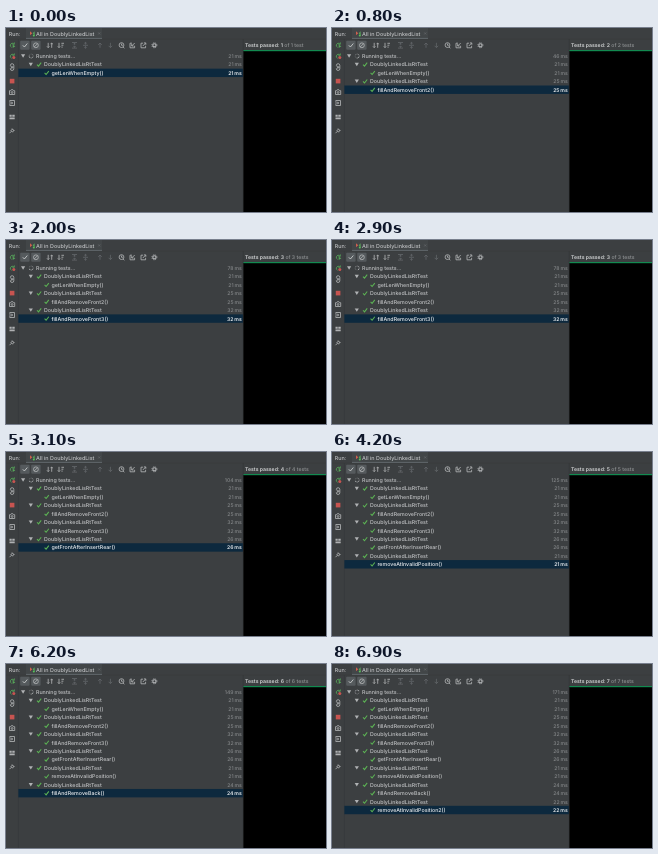
These frames come from a looping animation (320x184 px, 7000 ms). An HTML page:

```html
<!DOCTYPE html>
<html lang="en">
<head>
<meta charset="utf-8">
<title>Test runner</title>
<style>
  html, body { margin: 0; width: 100%; height: 100%; overflow: hidden; background: #3c3f41; }
  svg { display: block; width: 320px; height: 184px; }
  text { font: 500 5.3px Inter, "Open Sans", sans-serif; fill: #c0c2c4; text-rendering: geometricPrecision; white-space: pre; }
  .title { font-size: 5.4px; }
  .time { text-anchor: end; fill: #85888a; font-size: 5.1px; }
  .status { font-size: 5.15px; fill: #8f9294; }
  .strong { font-weight: 600; fill: #d2d4d5; }
  .selected text { fill: #eceef0; }
  .selected .time { font-weight: 600; }
  .icon { fill: none; stroke: #afb1b3; stroke-width: .85; }
  .dim { stroke: #616568; }
  .solid { fill: #afb1b3; }
  .green { stroke: #57a65a; }
  .tick { fill: none; stroke: #5cb354; stroke-width: 1.05; }
  .fold { fill: #b0b2b4; }
</style>
</head>
<body>
<svg id="stage" viewBox="0 0 320 184">
  <rect width="320" height="184" fill="#3c3f41"/>

  <!-- tab bar -->
  <rect x="20" width="76" height="10" fill="#424648"/>
  <path d="M0 11.2H320" stroke="#353839" stroke-width=".4"/>
  <rect x="20" y="9.9" width="76" height="1.1" fill="#5c6266"/>
  <text class="title" x="2.8" y="7.5">Run:</text>
  <path d="M24 3.2l2.2 2-2.2 2z" fill="#d0604f"/>
  <path d="M28.6 3.2l-2 2 2 2z" fill="#57a65a"/>
  <circle cx="27.8" cy="7.4" r="1" fill="#57c45a"/>
  <text class="title" x="30" y="7.5">All in DoublyLinkedList</text>
  <path class="icon dim" d="M92.3 4.5l1.9 1.9m0-1.9l-1.9 1.9"/>

  <!-- side strip -->
  <path d="M12.4 11V184" stroke="#343739" stroke-width=".4"/>
  <g class="icon">
    <path class="green" d="M7.7 15.7A2.1 2.1 0 1 0 5.6 19.3M8.3 14.4v1.9H6.4"/>
    <path d="M6.7 16.7l2.6 1.6-2.6 1.6z" fill="#57a65a" stroke="none"/>
    <path class="green" d="M7.7 26.7A2.1 2.1 0 1 0 5.6 30.3M8.3 25.4v1.9H6.4"/>
    <circle cx="7.8" cy="29.4" r="1.5" fill="#c75450" stroke="none"/>
    <path d="M4.4 38.4v-1a1.7 1.7 0 0 1 3.4 0v3.4a1.7 1.7 0 0 1-3.4 0v-.6M5.6 38.3l1.6 1-1.6 1z"/>
    <rect x="3.8" y="50.8" width="4.6" height="4.6" fill="#c75450" stroke="none"/>
    <path d="M3.5 62.7h1.2l.6-1h1.6l.6 1h1.2v3.8H3.5z"/>
    <circle cx="6.1" cy="64.5" r=".9"/>
    <path d="M3.8 73.8v-1.3h4.7v5H3.8v-1.3M3.2 75h3.4M5.3 73.7L6.6 75l-1.3 1.3"/>
    <path class="solid" stroke="none" d="M3.5 86.7h2.2v2H3.5zM6.3 86.7h2.4v2H6.3zM3.5 89.4h5.2v1.9H3.5z"/>
    <path d="M6 100.5l2.5 2.5M6.8 101.2l-2 1.2 1.8 1.8 1.2-2M5.5 103.2l-2 2"/>
  </g>

  <!-- toolbar -->
  <g fill="#555a5d">
    <rect x="14.2" y="12.8" width="9.4" height="9" rx="1"/>
    <rect x="25.2" y="12.8" width="9.4" height="9" rx="1"/>
  </g>
  <g class="icon">
    <path d="M16.8 17.3l1.6 1.7 2.9-3.5" stroke="#d0d2d3"/>
    <circle cx="29.9" cy="17.3" r="2.4"/>
    <path d="M28.2 19l3.4-3.4"/>
    <path d="M42.2 14.8v4.8M41 18.4l1.2 1.2 1.2-1.2M45.7 19.8V15M44.5 16.2l1.2-1.2 1.2 1.2"/>
    <path d="M53 14.8v4.8M51.8 18.4l1.2 1.2 1.2-1.2M55.4 15.3h2.6M55.4 17.2h2M55.4 19.1h1.3"/>
    <g class="dim">
      <path d="M66 14.5h5M66 20.1h5M68.5 16.8v-1.6M67.4 16.3l1.1-1.1 1.1 1.1M68.5 17.8v1.6M67.4 18.3l1.1 1.1 1.1-1.1"/>
      <path d="M77 17.3h5M79.5 13.9v2.2M78.3 15l1.2 1.1 1.2-1.1M79.5 20.7v-2.2M78.3 19.6l1.2-1.1 1.2 1.1"/>
      <path d="M94 19.8v-4.8M92.2 16.8l1.8-1.8 1.8 1.8"/>
      <path d="M104.4 14.8v4.8M102.6 17.8l1.8 1.8 1.8-1.8"/>
    </g>
    <circle cx="115.5" cy="17.1" r="2.4"/>
    <path d="M115.5 15.6v1.7h1.3M117 19l1.4 1.2"/>
    <path d="M126 15.2h-2v4.6h4.6v-2M128.7 15l-2.8 2.9M127.6 18h-1.9v-1.9"/>
    <path d="M137 15.2h-2v4.6h4.6v-2M136.8 18l2.8-2.9M137.9 14.9h1.9v1.9"/>
    <circle cx="148.4" cy="17.3" r="1.6" stroke-width="1.1"/>
    <circle cx="148.4" cy="17.3" r="2.5" stroke-dasharray="1 .963" stroke-width="1"/>
  </g>

  <g id="tree"></g>

  <!-- output pane -->
  <rect x="237.2" y="23" width="82.8" height="161" fill="#000"/>
  <path d="M237.2 11V184" stroke="#303335" stroke-width=".5"/>
  <rect x="237.5" y="22" width="82.5" height="1.2" fill="#128a50"/>
  <text id="status" class="status" x="239" y="18.8"><tspan class="strong"></tspan><tspan></tspan></text>
</svg>

<script>
const LOOP = 7000, ROW = 8.43, TOP = 28;
const SPIN_STEP = 135.5, SPIN_START = 2406;

// finish time, method, duration in ms
const tests = [
  [0, 'getLenWhenEmpty()', 21],
  [800, 'fillAndRemoveFront2()', 25],
  [1900, 'fillAndRemoveFront3()', 32],
  [3000, 'getFrontAfterInsertRear()', 26],
  [4100, 'removeAtInvalidPosition()', 21],
  [5200, 'fillAndRemoveBack()', 24],
  [6300, 'removeAtInvalidPosition2()', 22]
];

const tree = document.getElementById('tree');
const [passed, total] = document.getElementById('status').children;

function add(parent, tag, attrs, content) {
  const node = document.createElementNS('http://www.w3.org/2000/svg', tag);
  for (const name in attrs) node.setAttribute(name, attrs[name]);
  if (content) node.textContent = content;
  return parent.appendChild(node);
}

const duration = ms => ms + '\u2009ms';

function addRow(parent, index, x, label, ms) {
  const row = add(parent, 'g', { transform: `translate(0 ${TOP + index * ROW})` });
  row.back = add(row, 'rect', { x: 12.4, y: -ROW / 2, width: 224.6, height: ROW, fill: 'none' });
  add(row, 'text', { x, y: 1.95 }, label);
  row.time = add(row, 'text', { class: 'time', x: 235.7, y: 1.95 }, duration(ms));
  return row;
}

const addFold = (row, x) =>
  add(row, 'path', { class: 'fold', d: `M${x - 2.1} -1.7h4.2l-2.1 3.4z` });
const addTick = (row, x) =>
  add(row, 'path', { class: 'tick', d: `M${x - 2.1} .1l1.5 1.6 2.7-3.5` });

const root = addRow(tree, 0, 30, 'Running tests...', 0);
addFold(root, 17.1);
const dots = Array.from({ length: 8 }, (_, i) => {
  const angle = i * Math.PI / 4;
  return add(root, 'circle', {
    cx: 25.2 + 2 * Math.sin(angle), cy: -2 * Math.cos(angle), r: .55, fill: '#b4b6b8'
  });
});

const groups = tests.map(([, name, ms], i) => {
  const group = add(tree, 'g', {});
  const suite = addRow(group, 2 * i + 1, 38, 'DoublyLinkedLisRtTest', ms);
  addFold(suite, 24.8);
  addTick(suite, 33.1);
  group.leaf = addRow(group, 2 * i + 2, 45.4, name, ms);
  addTick(group.leaf, 40.7);
  return group;
});

function showTests(count) {
  groups.forEach((group, i) => {
    const current = i === count - 1;
    group.setAttribute('visibility', i < count ? 'visible' : 'hidden');
    group.leaf.setAttribute('class', current ? 'selected' : '');
    group.leaf.back.setAttribute('fill', current ? '#0d293e' : 'none');
  });
  const sum = tests.slice(0, count).reduce((acc, test) => acc + test[2], 0);
  root.time.textContent = duration(sum);
  passed.textContent = `Tests passed: ${count}`;
  total.textContent = ` of ${count} test${count > 1 ? 's' : ''}`;
}

function spin(time) {
  const head = Math.floor((time - SPIN_START) / SPIN_STEP) + 80;
  dots.forEach((dot, i) => dot.setAttribute('opacity', 1 - .11 * ((head - i) % 8)));
}

let shown = 0;
function draw() {
  const time = performance.now() % LOOP;
  const count = tests.filter(test => time >= test[0]).length;
  if (count !== shown) showTests(shown = count);
  spin(time);
  requestAnimationFrame(draw);
}
draw();
</script>
</body>
</html>
```
